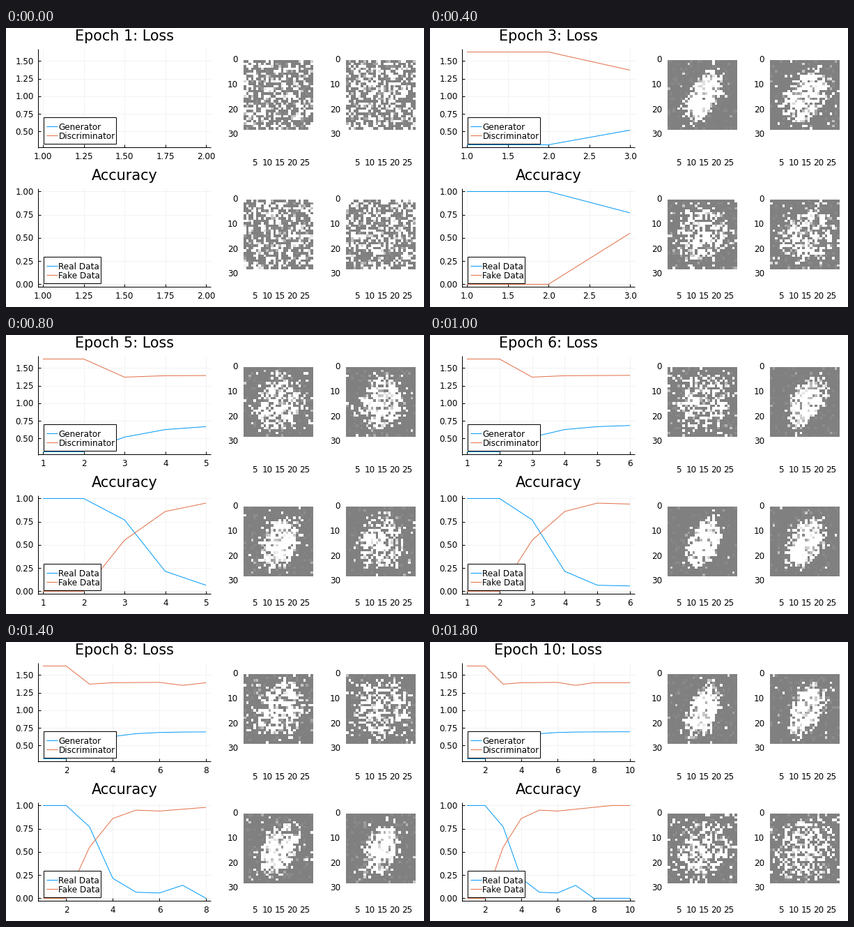
Animation, 600 px wide and 400 px high, one loop 2 s. Source, as a matplotlib script:

```python
import numpy as np
import matplotlib.pyplot as plt
from matplotlib.animation import FuncAnimation
from matplotlib.patches import Rectangle

W, H = 600, 400
PT = 0.72                   # points per pixel at 100 dpi
BLUE, ORANGE = "#009afa", "#e36f47"
LEFT, RIGHT = 46, 294       # panel edges
X_FIRST, X_LAST = 53, 287   # first and last epoch
CELLS = 28
EPOCHS = np.arange(1, 11)


def through(*points):
    """Values per epoch on straight segments between key points."""
    return np.interp(EPOCHS, *zip(*points))


GENERATOR = np.where(EPOCHS < 3, .3124, .695 - .175 * np.exp(.95 * (3 - EPOCHS)))
DISCRIMINATOR = through((2, 1.627), (3, 1.37), (4, 1.39), (6, 1.395), (7, 1.353), (8, 1.39))
REAL = through((2, 1), (3, .77), (4, .215), (5, .065), (6, .057), (7, .14), (8, 0))
FAKE = through((2, 0), (3, .55), (4, .86), (5, .95), (6, .94), (9, 1))

# How quickly each sample drifts in and out of focus, and its sharpest epoch
DRIFT = [(.8, 10.5), (1.5, 6.2), (.7, 6.5), (.9, 7)]


def density(epoch, k):
    """Chance of a bright cell: even noise at first, then a slanted blob."""
    if epoch < 3:
        return np.full((CELLS, CELLS), .34)
    rate, peak = DRIFT[k]
    focus = .55 + .4 * np.cos(rate * (epoch - peak))
    y, x = np.mgrid[:CELLS, :CELLS] - 14
    d = np.hypot((x + .35 * focus * y) / (11 - 5.5 * focus), y / (11 - 1.5 * focus))
    blob = (.3 + .55 * focus) / (1 + np.exp(9 * (d - 1)))
    return blob + .09 * (1 - focus) ** 2


def digit(epoch, k):
    rng = np.random.default_rng(100 * epoch + k)
    p = density(epoch, k)
    u, shade, faint = rng.random((3, CELLS, CELLS))
    img = np.where(faint < .15, .5 + shade * .05, .5)
    img = np.where(u < 1.35 * p + .02, .5 + shade * .5, img)
    return np.where(u < p, 1.0, img)


fig = plt.figure(figsize=(W / 100, H / 100), dpi=100, facecolor="white")
ax = fig.add_axes([0, 0, 1, 1])


def label(x, y, s, ha="center", size=12):
    """Text whose capitals are centred on y."""
    ax.text(x, y + .365 * size, s, ha=ha, va="baseline", size=size * PT,
            family="DejaVu Sans", color="black", zorder=6)


def line(x, y, color="black", z=3):
    ax.plot(x, y, color=color, lw=PT, zorder=z, solid_capstyle="butt")


def x_ticks(n):
    step = .25 if n == 2 else .5 if n == 3 else 1 if n < 8 else 2
    digits = {.25: 2, .5: 1}.get(step, 0)
    return [(v, f"{v:.{digits}f}") for v in np.arange(max(step, 1), n + .1, step)]


def legend(top, right, names):
    ax.add_patch(Rectangle((54, top), right - 54, 38, fc="white",
                           ec="black", lw=PT, zorder=4))
    for i, (name, color) in enumerate(zip(names, (BLUE, ORANGE))):
        y = top + 13 + 13 * i
        line([58, 74], [y, y], color, z=5)
        label(75.4, y + .2, name, "left")


def panel(epoch, top, title, y_of, y_ticks, series, names, legend_right):
    bottom = top + 141
    last = max(epoch, 2)

    def x_of(v):
        return X_FIRST + (v - 1) / (last - 1) * (X_LAST - X_FIRST)

    for v, text in x_ticks(last):
        x = x_of(v)
        line([x, x], [top, bottom], "#f2f2f2", z=1)
        line([x, x], [bottom, bottom - 4])
        label(x + .3, bottom + 12.3, text)
    for v in y_ticks:
        y = y_of(v)
        line([LEFT, RIGHT], [y, y], "#f2f2f2", z=1)
        line([LEFT, LEFT + 4], [y, y])
        label(40, y, f"{v:.2f}", "right")
    line([LEFT, LEFT], [top, bottom + 1])
    line([LEFT, RIGHT], [bottom, bottom])

    if epoch > 1:
        xs = x_of(EPOCHS[:epoch])
        for data, color in zip(series, (BLUE, ORANGE)):
            line(xs, y_of(data[:epoch]), color)
    legend(top + 98, legend_right, names)
    label((LEFT + RIGHT) / 2, top - 19.8, title, size=20.8)


def sample(epoch, k):
    left, top = 341 + 147 * (k % 2), 46 + 200 * (k // 2)
    ax.imshow(digit(epoch, k), cmap="gray", vmin=0, vmax=1, aspect="auto",
              interpolation="nearest", extent=(left, left + 100, top + 100, top))
    cell = 100 / CELLS
    for v in (0, 10, 20, 30):
        label(left - 8, top - 1.3 + v * cell, str(v), "right")
    for v in (5, 10, 15, 20, 25):
        label(left + (v - .5) * cell, 193 if k < 2 else 383.2, str(v))


def draw(i):
    epoch = i + 1
    ax.clear()
    panel(epoch, 30, f"Epoch {epoch}: Loss", lambda v: 148.45 - (v - .5) * 101.2,
          np.arange(.5, 1.6, .25), (GENERATOR, DISCRIMINATOR),
          ("Generator", "Discriminator"), 158)
    panel(epoch, 230, "Accuracy", lambda v: 367.4 - v * 133,
          np.arange(0, 1.1, .25), (REAL, FAKE), ("Real Data", "Fake Data"), 136)
    for k in range(4):
        sample(epoch, k)
    ax.set(xlim=(0, W), ylim=(H, 0))
    ax.axis("off")
    return []


anim = FuncAnimation(fig, draw, frames=10, interval=200, init_func=lambda: [],
                     repeat=True, repeat_delay=0)
plt.show()
```
